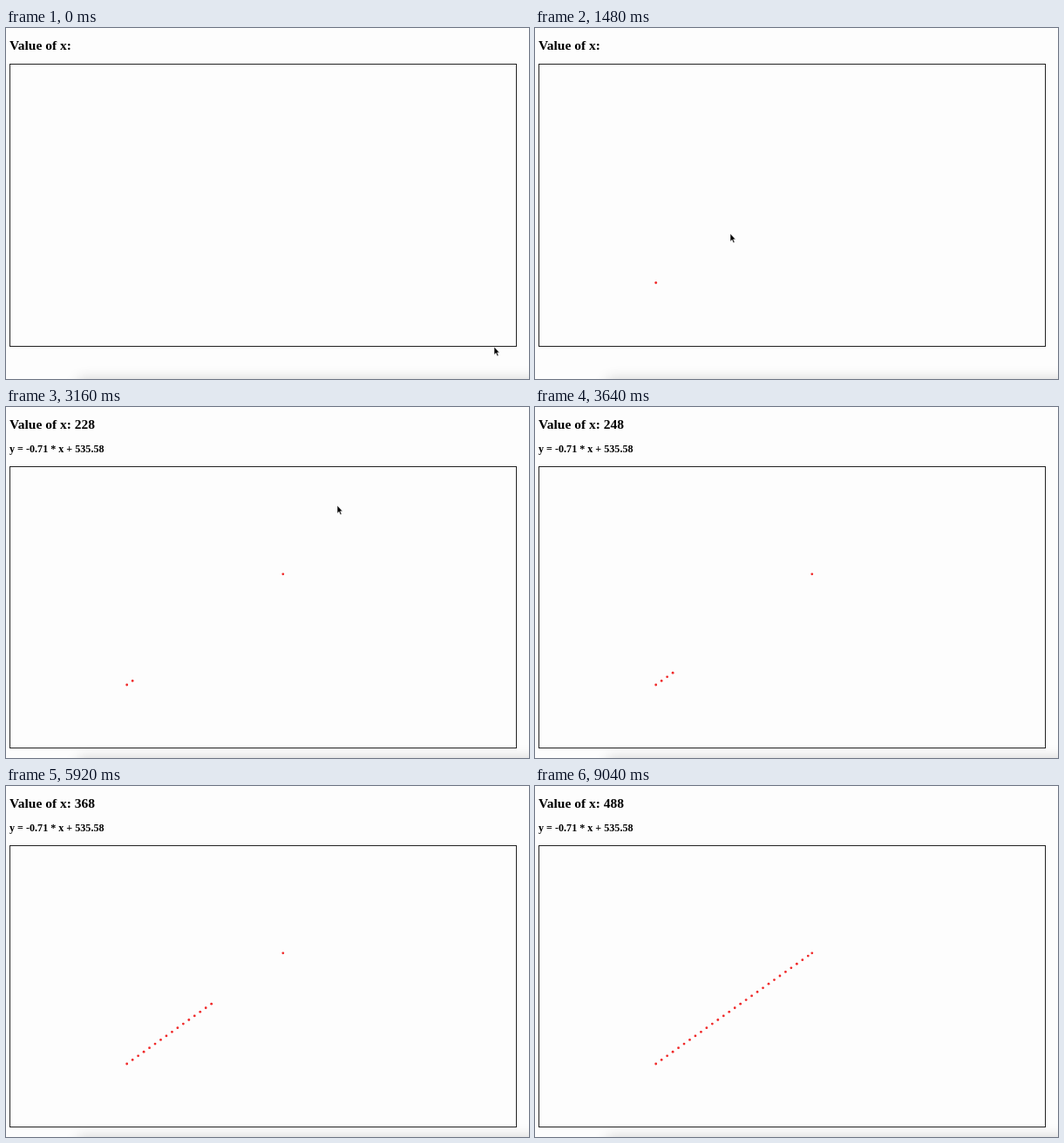
Recreate the animation shown at these times as an HTML page. Size 600 by 403 pixels, loop 9.2 s.

```html
<!DOCTYPE html>
<html lang="en">
<head>
<meta charset="utf-8">
<title>Line plotter</title>
<style>
  html, body { margin: 0; width: 100%; height: 100%; overflow: hidden; background: #fdfdfd; }
  #stage { position: relative; width: 600px; height: 403px; overflow: hidden; }
  svg { position: absolute; left: 0; top: 0; }
  text { font-family: "Liberation Serif", Times, serif; font-weight: bold; fill: #000; }
  .shade {
    position: absolute; left: 83px; top: 404px; width: 640px; height: 60px;
    box-shadow: 0 0 15px rgba(0, 0, 0, .2);
  }
</style>
</head>
<body>
<div id="stage">
  <div class="shade"></div>
  <svg width="600" height="403" viewBox="0 0 600 403">
    <text id="label" x="4" y="24.5" font-size="15.5">Value of x:</text>
    <text id="equation" x="4" y="52.3" font-size="12.1">y = -0.71 * x + 535.58</text>
    <g id="plot">
      <rect x="4.5" y="41.6" width="581" height="323.6" fill="none" stroke="#222" shape-rendering="crispEdges"/>
      <g id="dots" fill="#f02a2a"></g>
    </g>
    <path id="cursor" d="M0 0V9.2L2.1 7.3L3.6 10.8L5.1 10.1L3.6 6.8H6.2Z" stroke="#fff" stroke-width=".6"/>
  </svg>
</div>
<script>
  const LOOP = 9200, TICK = 40;
  const FIRST_CLICK = 1080, SECOND_CLICK = 2720, STEP_TIME = 200;
  const START = 208, END = 485, STEP = 10, STEPS = 28;
  const SCALE = 0.6466, SHIFT = 26.5;
  const $ = id => document.getElementById(id);

  const smooth = p => p * p * (3 - 2 * p);
  const linear = p => p;
  const easeOut = p => 1 - (1 - p) ** 1.5;

  // Cursor stops: time, x, y, easing on the way there
  const stops = [
    [80, 560, 366],
    [600, 138, 292, smooth],
    [1200, 138, 292, linear],
    [1480, 224, 236, p => p ** 1.3],
    [1800, 300, 178, easeOut],
    [2080, 300, 178, linear],
    [2560, 318, 164, smooth],
    [3040, 318, 164, linear],
    [3160, 380, 113, p => p ** 1.3],
    [3560, 510, -14, easeOut]
  ];

  function cursorAt(t) {
    const i = stops.findIndex(s => s[0] >= t);
    if (i < 0) return stops[stops.length - 1].slice(1, 3);
    if (i === 0) return stops[0].slice(1, 3);
    const [t0, x0, y0] = stops[i - 1];
    const [t1, x1, y1, ease] = stops[i];
    const p = ease((t - t0) / (t1 - t0));
    return [x0 + (x1 - x0) * p, y0 + (y1 - y0) * p];
  }

  function addDot(x) {
    const dot = document.createElementNS("http://www.w3.org/2000/svg", "circle");
    dot.setAttribute("cx", 4.2 + x * SCALE);
    dot.setAttribute("cy", 41.7 + (535.58 - 0.71 * x) * SCALE);
    dot.setAttribute("r", 1.4);
    $("dots").append(dot);
    return dot;
  }

  const show = (el, on) => el.setAttribute("visibility", on ? "visible" : "hidden");
  const line = Array.from({ length: STEPS }, (_, i) => addDot(START + i * STEP));
  const endDot = addDot(END);

  function draw(time) {
    const t = Math.floor((time % LOOP) / TICK) * TICK;
    const plotting = t >= SECOND_CLICK;
    const steps = Math.min(STEPS, Math.floor((t - SECOND_CLICK) / STEP_TIME));

    $("label").textContent = "Value of x:" + (plotting ? " " + (START + steps * STEP) : "");
    show($("equation"), plotting);
    $("plot").setAttribute("transform", `translate(0 ${plotting ? SHIFT : 0})`);
    line.forEach((dot, i) => show(dot, i ? i < steps : t >= FIRST_CLICK));
    show(endDot, plotting);
    $("cursor").setAttribute("transform", `translate(${cursorAt(t).join(" ")})`);
  }

  const begin = performance.now();
  function frame() {
    draw(performance.now() - begin);
    requestAnimationFrame(frame);
  }
  frame();
</script>
</body>
</html>
```
